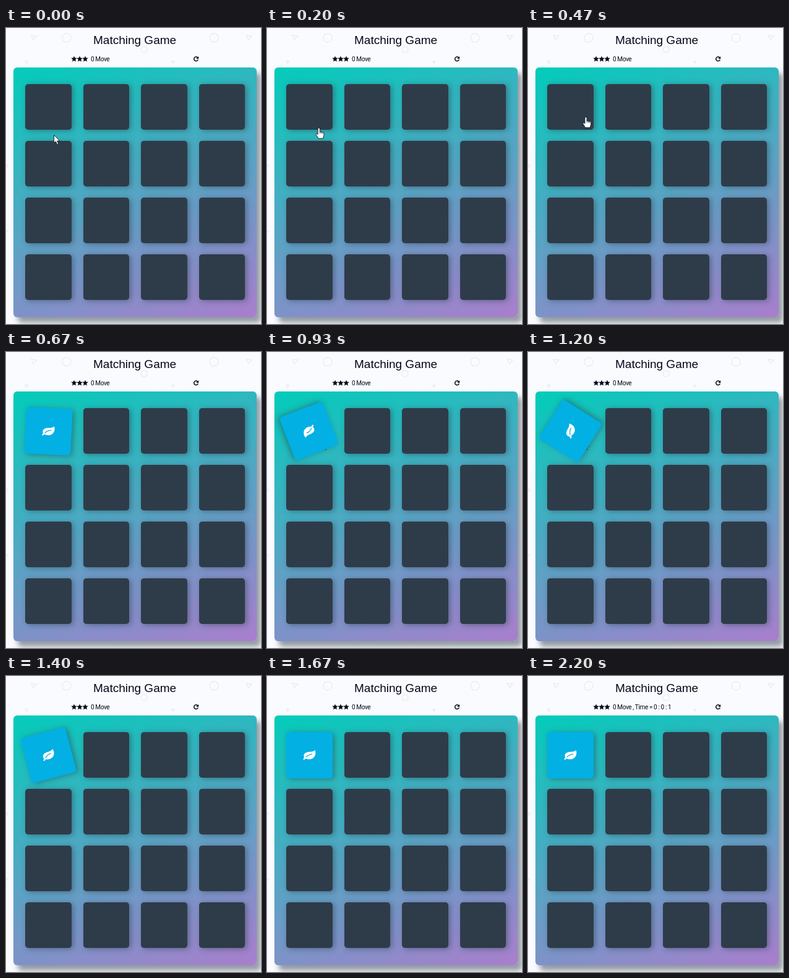
Recreate the animation shown at these times as an HTML page. Size 412 by 480 pixels, loop 2.34 s.

```html
<!DOCTYPE html>
<html lang="en">
<head>
<meta charset="utf-8">
<title>Matching Game</title>
<style>
  html, body { margin: 0; width: 100%; height: 100%; overflow: hidden; background: #fafbfe; }
  #stage { position: absolute; left: 0; top: 0; width: 412px; height: 480px; overflow: hidden; }
  #stage > svg { position: absolute; left: 0; top: 0; }
  #deck {
    position: absolute; left: 12px; top: 63.5px; width: 393px; height: 405.5px;
    border-radius: 6px;
    background: linear-gradient(160deg, #02ccba 0%, #aa7ecd 100%);
    box-shadow: 7px 9px 9px rgba(46, 61, 73, .5);
  }
  .card {
    position: absolute; width: 74.5px; height: 74.5px; border-radius: 4.8px;
    background: #2e3c4a;
    box-shadow: 3px 1.5px 10px rgba(46, 61, 73, .5);
  }
  .card.open { background: #02b0e4; z-index: 1; }
  .card svg { display: none; position: absolute; left: 0; top: 0; }
  .card.open svg { display: block; }
  text { fill: #04061a; }
  .title { font: 19px "Liberation Sans", Arial, sans-serif; }
  .info { font: 10px Roboto, sans-serif; letter-spacing: -.38px; }
</style>
</head>
<body>
<div id="stage">
  <svg width="412" height="480">
    <g fill="none" stroke="#ebecf2" stroke-width="1.3">
      <circle cx="98" cy="16" r="7"/>
      <circle cx="336" cy="16" r="7"/>
      <circle cx="223" cy="35" r="5"/>
      <path d="M41 12l9 1-6 6zM388 12l9 1-5 6zM31 53l5 1-3 4zM268 54h4l-2 3zM0 221l4 3-4 2M0 328l3 2-3 2"/>
    </g>
  </svg>
  <div id="deck"></div>
  <svg width="412" height="480">
    <text class="title" x="141" y="26">Matching Game</text>
    <g id="stars" fill="#04061a"></g>
    <text class="info" id="info" x="137" y="54"></text>
    <path d="M309.6 47.9A3.4 3.4 0 1 0 310.3 51.3" fill="none" stroke="#04061a" stroke-width="1.5"/>
    <path d="M311.2 46v4h-4z" fill="#04061a"/>
    <g id="cursor" fill="#fff" stroke="#10182a" stroke-width=".9" stroke-linejoin="round">
      <path id="arrow" d="M0 0V13L2.9 10.4 5 15.3 7.2 14.3 5.2 9.6H9.2z"/>
      <g id="hand">
        <path d="M-1.6 1.5Q-1.6 0 0 0T1.6 1.5V6L7 7.2Q8.2 7.6 8.2 9V12L6.7 17H-.8L-4.6 11Q-5 9-3.5 9L-1.6 10.5z"/>
        <path d="M1.6 6v3M3.9 6.8v2.6M6 7.3v2.2" fill="none" stroke-width=".7"/>
      </g>
    </g>
  </svg>
</div>
<script>
const LOOP = 2340, STEP = 1000 / 15;
const CLICK = 665, SPIN_START = 676, SPIN_TIME = 970, TIMER = 1730;
const $ = id => document.getElementById(id);
const clamp = v => Math.min(1, Math.max(0, v));
const smooth = v => v * v * (3 - 2 * v);
const mix = (a, b, k) => a + (b - a) * k;

// CSS "ease": cubic-bezier(.25, .1, .25, 1), solved by bisection
function ease(x) {
  const bez = (s, a, b) => 3 * s * (1 - s) ** 2 * a + 3 * s * s * (1 - s) * b + s ** 3;
  let lo = 0, hi = 1;
  for (let i = 0; i < 24; i++) {
    const mid = (lo + hi) / 2;
    if (bez(mid, .25, .25) < x) lo = mid; else hi = mid;
  }
  return bez(hi, .1, 1);
}

for (let i = 0; i < 16; i++) {
  const el = document.createElement("div");
  el.className = "card";
  el.style.left = 19 + (i % 4) * 93.5 + "px";
  el.style.top = 27.3 + Math.floor(i / 4) * 92 + "px";
  $("deck").append(el);
}
const card = $("deck").firstChild;
card.innerHTML = `<svg width="74.5" height="74.5" viewBox="-37.25 -37.25 74.5 74.5">
  <path fill="#fff" d="M9.4-8C11-3 10 2 6 5C2 7.8-3 7-5.6 5.4L-8.2 7.8-10.2 6.6-8 4.2C-10.6-2-6-5 0-5.2C5-5.4 7-6 9.4-8z"/>
  <path fill="none" stroke="#02b0e4" stroke-width="1.3" stroke-linecap="round" d="M-5 3C-2 0 1-1.4 4.6-1.4"/>
</svg>`;

function star(cx, cy, r) {
  const pts = [];
  for (let i = 0; i < 10; i++) {
    const a = i * Math.PI / 5 - Math.PI / 2, d = i % 2 ? r * .46 : r;
    pts.push((cx + d * Math.cos(a)).toFixed(2) + "," + (cy + d * Math.sin(a)).toFixed(2));
  }
  return `<polygon points="${pts.join(" ")}"/>`;
}
$("stars").innerHTML = [110, 119, 128].map(x => star(x, 50.4, 5)).join("");

function draw(t) {
  const open = t >= CLICK;
  const turn = ease(clamp((t - SPIN_START) / SPIN_TIME)) * 360;
  card.classList.toggle("open", open);
  card.style.transform = open ? `rotate(${Math.max(3, turn)}deg)` : "none";

  const reach = smooth(clamp(t / 467)), settle = smooth(clamp((t - 467) / 133));
  const x = mix(mix(77.5, 93.5, reach), 88.7, settle);
  const y = mix(mix(173.5, 144.5, reach), 143.5, settle);
  const hand = !open && y < 165;
  $("cursor").setAttribute("transform", `translate(${x} ${y})`);
  $("hand").style.display = hand ? "" : "none";
  $("arrow").style.display = hand ? "none" : "";

  $("info").textContent = "0 Move" + (t >= TIMER ? " , Time = 0 : 0 : 1" : "");
}

const start = performance.now();
function tick() {
  const t = (performance.now() - start) % LOOP;
  draw(Math.floor((t + 4) / STEP) * STEP);
  requestAnimationFrame(tick);
}
tick();
</script>
</body>
</html>
```
